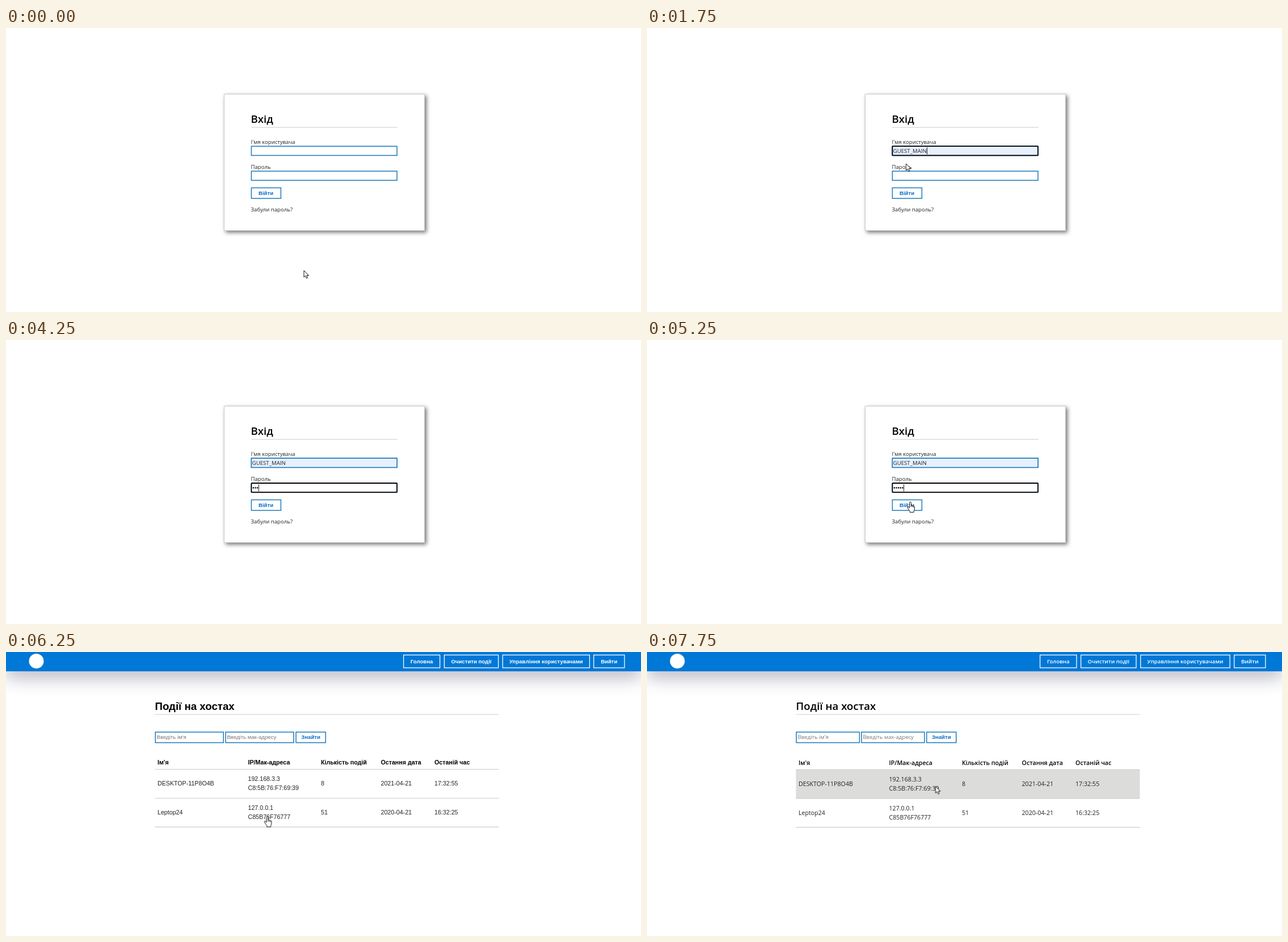
An HTML page for the animation above (8000 ms loop, 1119 by 500 pixels).

```html
<!DOCTYPE html>
<html lang="uk">
<head>
<meta charset="utf-8">
<title>Вхід</title>
<style>
html, body { margin: 0; width: 100%; height: 100%; overflow: hidden; background: #fff; }
#stage { position: relative; width: 1119px; height: 500px; overflow: hidden; }
.scene, svg { position: absolute; left: 0; top: 0; width: 1119px; height: 500px; }
.scene { overflow: hidden; }
.card { position: absolute; left: 384px; top: 116px; width: 352px; height: 239px; border: 1px solid #ccc;
  background: #fff; box-shadow: 3px 3px 7px rgba(0,0,0,.55); }
.bar { position: absolute; left: 0; top: 0; width: 1119px; height: 34px; background: #0078d7;
  box-shadow: 0 10px 32px rgba(40,45,80,.36); }

text { font: 9.6px 'Open Sans', sans-serif; fill: #222; white-space: pre; }
.plain text, .btn text { font-family: 'Liberation Sans', Arial, sans-serif; }
text.h { font-size: 18.67px; font-weight: 600; fill: #000; }
text.th { font-size: 10.67px; font-weight: 600; fill: #000; }
text.td { font-size: 10.67px; }
text.ph { fill: #777; }
.plain text.h, .plain text.th { font-weight: 700; }
text.nav { font-weight: 600; fill: #fff; }
.plain text.nav { font-weight: 700; }
.btn text { font-weight: 700; fill: #0b6cc6; }
.box { fill: #fff; stroke: #1b79bb; stroke-width: 1.5; }
.nav-box { fill: none; stroke: #fff; stroke-width: 1.3; }
.focus { fill: none; stroke: #000; stroke-width: 1.8; }
.rule { stroke: #ccc; stroke-width: 1.1; }

/* everything below runs on one 8 s clock with hard steps */
.a { animation: 8s step-end infinite; }
#login { animation-name: login; }
#events { opacity: 0; animation-name: events; }
#first { animation-name: first; }
#second { opacity: 0; animation-name: second; }
#row1 { fill: #fff; animation-name: row1; }
#row2 { fill: #fff; animation-name: row2; }
#nameFocus { opacity: 0; animation-name: nameFocus; }
#filled { opacity: 0; animation-name: filled; }
#nameCaret { opacity: 0; animation-name: nameCaret; }
#passFocus { opacity: 0; animation-name: passFocus; }
#passCaret { opacity: 0; animation-name: passCaret; }
#typing { animation-name: typing; }
#btnFocus { opacity: 0; animation-name: btnFocus; }
#pointer { transform: translate(525px,427px); animation-name: pointer; }
#arrow { animation-name: arrow; }
#hand { opacity: 0; animation-name: hand; }

@keyframes login { 0% { opacity: 1 } 78.125% { opacity: 0 } }
@keyframes events { 0% { opacity: 0 } 78.125% { opacity: 1 } }
@keyframes first { 0% { opacity: 1 } 81.25% { opacity: 0 } }
@keyframes second { 0% { opacity: 0 } 81.25% { opacity: 1 } }
@keyframes row1 { 0% { fill: #fff } 87.5% { fill: #f4f4f4 } 90.625% { fill: #dcdcda } }
@keyframes row2 { 0% { fill: #fff } 81.25% { fill: #ececeb } 84.375% { fill: #dcdcda } 87.5% { fill: #f9f9f9 } 90.625% { fill: #fff } }
@keyframes nameFocus { 0% { opacity: 0 } 15.625% { opacity: 1 } 28.125% { opacity: 0 } }
@keyframes filled { 0% { opacity: 0 } 18.75% { opacity: 1 } }
@keyframes nameCaret { 0% { opacity: 0 } 18.75% { opacity: 1 } 25% { opacity: 0 } }
@keyframes passFocus { 0% { opacity: 0 } 28.125% { opacity: 1 } 71.875% { opacity: 0 } }
@keyframes passCaret { 0% { opacity: 0 } 28.125% { opacity: 1 } 34.375% { opacity: 0 } 40.625% { opacity: 1 } 71.875% { opacity: 0 } }
@keyframes typing {
  0% { transform: none }
  46.875% { transform: translateX(3.6px) }
  50% { transform: translateX(7.2px) }
  53.125% { transform: translateX(10.8px) }
  56.25% { transform: translateX(14.4px) }
  59.375% { transform: translateX(18px) }
}
@keyframes btnFocus { 0% { opacity: 0 } 71.875% { opacity: 1 } }
@keyframes pointer {
  0% { transform: translate(525px,427px) }
  3.125% { transform: translate(516px,372px) }
  6.25% { transform: translate(497px,305px) }
  9.375% { transform: translate(478px,248px) }
  18.75% { transform: translate(450px,232px) }
  21.875% { transform: translate(456.5px,239px) }
  25% { transform: translate(462px,247px) }
  28.125% { transform: translate(465px,256px) }
  62.5% { transform: translate(465px,268px) }
  65.625% { transform: translate(464px,285px) }
  68.75% { transform: translate(460.5px,289.5px) }
  84.375% { transform: translate(480px,270px) }
  87.5% { transform: translate(513px,237.5px) }
  93.75% { transform: translate(508.5px,236.5px) }
}
@keyframes arrow {
  0% { opacity: 1 } 12.5% { opacity: 0 } 18.75% { opacity: 1 } 31.25% { opacity: 0 }
  62.5% { opacity: 1 } 65.625% { opacity: 0 } 93.75% { opacity: 1 }
}
@keyframes hand { 0% { opacity: 0 } 65.625% { opacity: 1 } 93.75% { opacity: 0 } }
</style>
</head>
<body>
<div id="stage">
  <div id="login" class="scene a">
    <div class="card"></div>
    <svg viewBox="0 0 1119 500">
      <text class="h" x="431.5" y="167">Вхід</text>
      <path class="rule" d="M432 175H690"/>
      <text x="431.5" y="203.8">І'мя користувача</text>
      <rect class="box" x="432.4" y="208.2" width="256.6" height="16.2"/>
      <g id="filled" class="a">
        <rect class="box" x="432.4" y="208.2" width="256.6" height="16.2" style="fill:#e8f0fe"/>
        <text x="433.8" y="219.8">GUEST_MAIN</text>
      </g>
      <rect id="nameFocus" class="focus a" x="432.4" y="208.2" width="256.6" height="16.2" rx="1.5"/>
      <path id="nameCaret" class="a" d="M493.5 210V222.5" stroke="#000" stroke-width=".9"/>

      <text x="431.5" y="247.6">Пароль</text>
      <rect class="box" x="432.4" y="252" width="256.6" height="16.2"/>
      <path d="M435.9 260.2h14.5" stroke="#000" stroke-width="2.6" stroke-linecap="round" stroke-dasharray="0 3.6"/>
      <g id="typing" class="a">
        <rect x="434.2" y="254" width="22" height="12" fill="#fff"/>
        <path id="passCaret" class="a" d="M434.6 254V266.5" stroke="#000" stroke-width=".9"/>
      </g>
      <rect id="passFocus" class="focus a" x="432.4" y="252" width="256.6" height="16.2" rx="1.5"/>

      <g class="btn" text-anchor="middle">
        <rect class="box" x="432.4" y="281.4" width="52" height="18.6"/>
        <text x="458" y="293.8">Війти</text>
        <g id="btnFocus" class="a">
          <rect class="focus" x="432.4" y="281.4" width="52" height="18.6" rx="1.5" style="fill:#fff"/>
          <text x="458" y="293.8" style="fill:#14142a">Війти</text>
        </g>
      </g>
      <text x="431.5" y="323.3">Забули пароль?</text>
    </svg>
  </div>

  <div id="events" class="scene a">
    <div class="bar"></div>
    <svg viewBox="0 0 1119 500">
      <circle cx="53.5" cy="16" r="13" fill="#fff"/>
      <g id="first" class="plain a"></g>
      <g id="second" class="a"></g>
    </svg>
  </div>

  <svg viewBox="0 0 1119 500">
    <g id="pointer" class="a" fill="#fff" stroke="#000" stroke-width=".95" stroke-linejoin="round">
      <path id="arrow" class="a" d="M0 0V11.8L2.7 9.3 4.6 13.6 6.6 12.7 4.8 8.6H8.5Z"/>
      <g id="hand" class="a">
        <path d="M-1.4 10.5V1.5a1.4 1.4 0 0 1 2.8 0V6.4q2-.8 2.3.5 1.7-.5 2 .7 1.6-.3 1.6 1.2V13q0 2-1.2 3.4V18.3H-.8V16.4q-1.4-1.5-2.2-3.2L-5 10q-.5-1.5.9-1.7 1 0 2.7 2.2Z"/>
        <path d="M1.4 6.4V9M3.7 7V9.4M5.7 7.8V9.8" fill="none" stroke-width=".8"/>
      </g>
    </g>
  </svg>
</div>
<script>
const text = (cls, x, y, s, extra = '') => `<text class="${cls}" x="${x}" y="${y}" ${extra}>${s}</text>`;
const rect = (cls, x1, y1, x2, y2, extra = '') =>
  `<rect class="${cls}" x="${x1}" y="${y1}" width="${x2 - x1}" height="${y2 - y1}" ${extra}/>`;
const rule = y => `<path class="rule" d="M262.5 ${y}H868.5"/>`;
const mid = 'text-anchor="middle"';

const cols = [267, 426.5, 555, 660.5, 755];
const heads = ["Ім'я", 'IP/Мак-адреса', 'Кількість подій', 'Остання дата', 'Останій час'];
const hosts = [
  ['DESKTOP-11P8O4B', ['192.168.3.3', 'C8:5B:76:F7:69:39'], '8', '2021-04-21', '17:32:55'],
  ['Leptop24', ['127.0.0.1', 'C85B76F76777'], '51', '2020-04-21', '16:32:25']
];
const menu = ['Головна', 'Очистити події', 'Управління користувачами', 'Вийти'];

// top: y of the rule under the table head; tabs: left and right edge of each menu button
function page({ tabs, fields, top, hover }) {
  const [a, b, c, d, e, f] = fields;
  const nav = menu.map((s, i) => {
    const [l, r] = tabs[i];
    return rect('nav-box', l, 5.3, r, 27.8) + text('nav', (l + r) / 2, 20, s, mid);
  });
  const search = rect('box', a, 141, b, 159.6) + text('ph', a + 2.4, 153.3, "Введіть ім'я") +
    rect('box', c, 141, d, 159.6) + text('ph', c + 2.4, 153.3, 'Введіть мак-адресу') +
    `<g class="btn">${rect('box', e, 141, f, 159.6)}${text('', (e + f) / 2, 153.4, 'Знайти', mid)}</g>`;
  const rows = hosts.map((row, i) => {
    const y = top + 51 * i;
    const cells = row.map((v, k) => k === 1
      ? text('td', cols[k], y + 20.8, v[0]) + text('td', cols[k], y + 36.8, v[1])
      : text('td', cols[k], y + 28.8, v));
    const back = hover ? rect('a', 262.5, y, 868.5, y + 51, `id="row${i + 1}"`) : '';
    return back + rule(y) + cells.join('');
  });
  return nav.join('') + text('h', 262.5, 101.6, 'Події на хостах') + rule(110) + search +
    heads.map((s, k) => text('th', cols[k], top - 8.2, s)).join('') + rows.join('') + rule(top + 101.6);
}

first.innerHTML = page({
  tabs: [[700.6, 764.6], [772.4, 867.6], [875.3, 1028.4], [1035.7, 1089.9]],
  fields: [263.2, 383.2, 387, 507, 511, 563.2],
  top: 206.5
});
second.innerHTML = page({
  tabs: [[692.6, 757], [764.6, 862], [869.8, 1027.2], [1034.8, 1089.9]],
  fields: [263.2, 374.4, 378, 489, 492.8, 544.8],
  top: 207,
  hover: true
});
</script>
</body>
</html>
```
